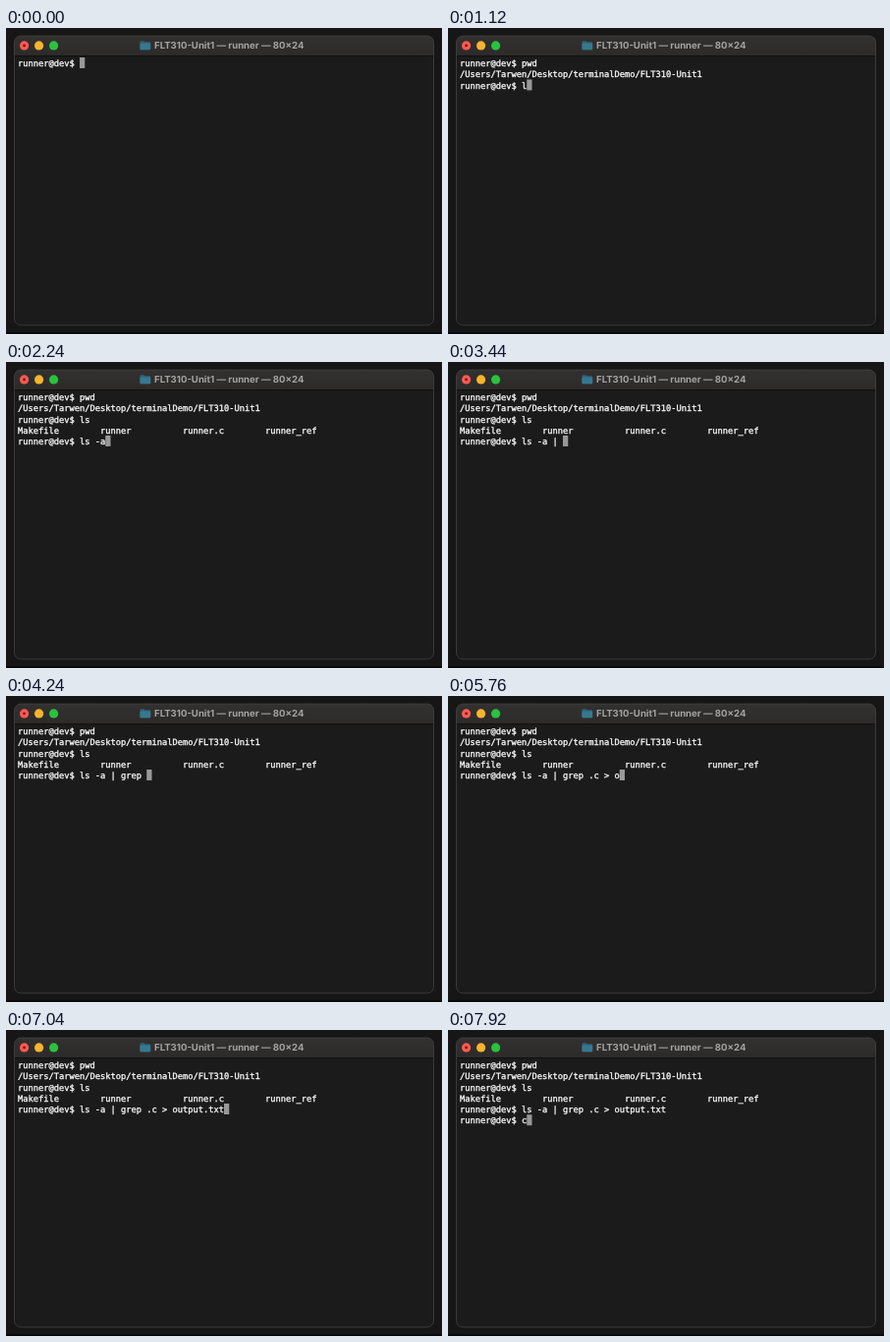
Write an HTML page that moves like this. It is 444 by 312 pixels and loops after 8000 ms.

```html
<!DOCTYPE html>
<html lang="en">
<head>
<meta charset="utf-8">
<title>Terminal</title>
<style>
  html, body { margin: 0; width: 100%; height: 100%; overflow: hidden; background: #161616; }
  svg { display: block; width: 100%; height: 100%; }
  text { white-space: pre; text-rendering: geometricPrecision; }
  .title { font: 700 9.6px Inter, sans-serif; fill: #a5a3a2; }
  #lines { font: 8.72px "DejaVu Sans Mono", monospace; fill: #fafafa; stroke: #fafafa; stroke-width: .32; }
</style>
</head>
<body>
<svg viewBox="0 0 444 312">
  <defs>
    <linearGradient id="bar" x2="0" y2="1">
      <stop stop-color="#333130"/>
      <stop offset="1" stop-color="#2d2b2a"/>
    </linearGradient>
    <clipPath id="frame"><rect x="8.5" y="8" width="427" height="295" rx="6.5"/></clipPath>
  </defs>
  <rect width="444" height="312" fill="#161616"/>
  <rect y="310.5" width="444" height="1.5" fill="#050505"/>
  <rect x="8" y="7.5" width="428" height="296" rx="7" fill="#0e0e0e"/>
  <g clip-path="url(#frame)">
    <rect x="8" y="8" width="428" height="296" fill="#1b1b1b"/>
    <rect x="8" y="8" width="428" height="20" fill="url(#bar)"/>
    <rect x="8" y="28" width="428" height=".8" fill="#0d0d0d"/>
  </g>
  <rect x="8.5" y="8" width="427" height="295" rx="6.5" fill="none" stroke="#464544" stroke-width=".8"/>
  <circle cx="18.6" cy="17.9" r="4.6" fill="#fe5a52"/>
  <circle cx="18.6" cy="17.9" r="1.4" fill="#7c0d08"/>
  <circle cx="33.6" cy="17.9" r="4.6" fill="#f9b42d"/>
  <circle cx="48.6" cy="17.9" r="4.6" fill="#2ac23f"/>
  <path d="M136.5 14.2q0-1 1-1h3l1.1 1.1h4.6q1 0 1 1v5.9q0 1-1 1h-8.7q-1 0-1-1z" fill="#2c6378"/>
  <rect x="136.5" y="15.5" width="10.7" height="6.7" rx=".9" fill="#37788f"/>
  <text class="title" x="151" y="21.2">FLT310-Unit1 — runner — 80×24</text>
  <rect id="cursor" width="5.25" height="11" fill="#989898"/>
  <g id="lines"></g>
</svg>
<script>
const LOOP = 8000, LEFT = 12, TOP = 30, CELL = 5.25, ROW = 11.25;
const PROMPT = 'runner@dev$ ';
const OUTPUT = {
  pwd: ['/Users/Tarwen/Desktop/terminalDemo/FLT310-Unit1'],
  ls: [['Makefile', 'runner', 'runner.c', 'runner_ref'].map(f => f.padEnd(16)).join('')]
};
const KEYS = 'pwd\nls\nls -a | grep .c > output.txt\nc';
// Time of each key press, in ms
const TIMES = [
  160, 320, 400, 560,
  1120, 1280, 1440,
  1600, 1760, 1920, 2000, 2240, 2800, 3040, 3440,
  3760, 3840, 4000, 4080, 4240, 4400, 4480, 4800,
  5280, 5440, 5760, 5840, 5920, 6080, 6160, 6240,
  6640, 6800, 6880, 7040, 7680,
  7920
];

const cursor = document.getElementById('cursor');
const group = document.getElementById('lines');
const rows = Array.from({ length: 6 }, (_, i) => {
  const row = document.createElementNS('http://www.w3.org/2000/svg', 'text');
  row.setAttribute('x', LEFT);
  row.setAttribute('y', TOP + 9 + i * ROW);
  return group.appendChild(row);
});

function screen(typed) {
  const commands = typed.split('\n');
  const last = commands.length - 1;
  return commands.flatMap((cmd, i) =>
    [PROMPT + cmd, ...(i < last && OUTPUT[cmd] || [])]);
}

let shown = -1;
function draw(t) {
  const count = TIMES.filter(time => time <= t).length;
  if (count === shown) return;
  shown = count;
  const lines = screen(KEYS.slice(0, count));
  const last = lines.length - 1;
  rows.forEach((row, i) => { row.textContent = lines[i] || ''; });
  cursor.setAttribute('x', LEFT + lines[last].length * CELL);
  cursor.setAttribute('y', TOP + last * ROW);
}

const start = performance.now();
function tick() {
  draw((performance.now() - start) % LOOP);
  requestAnimationFrame(tick);
}
tick();
</script>
</body>
</html>
```
